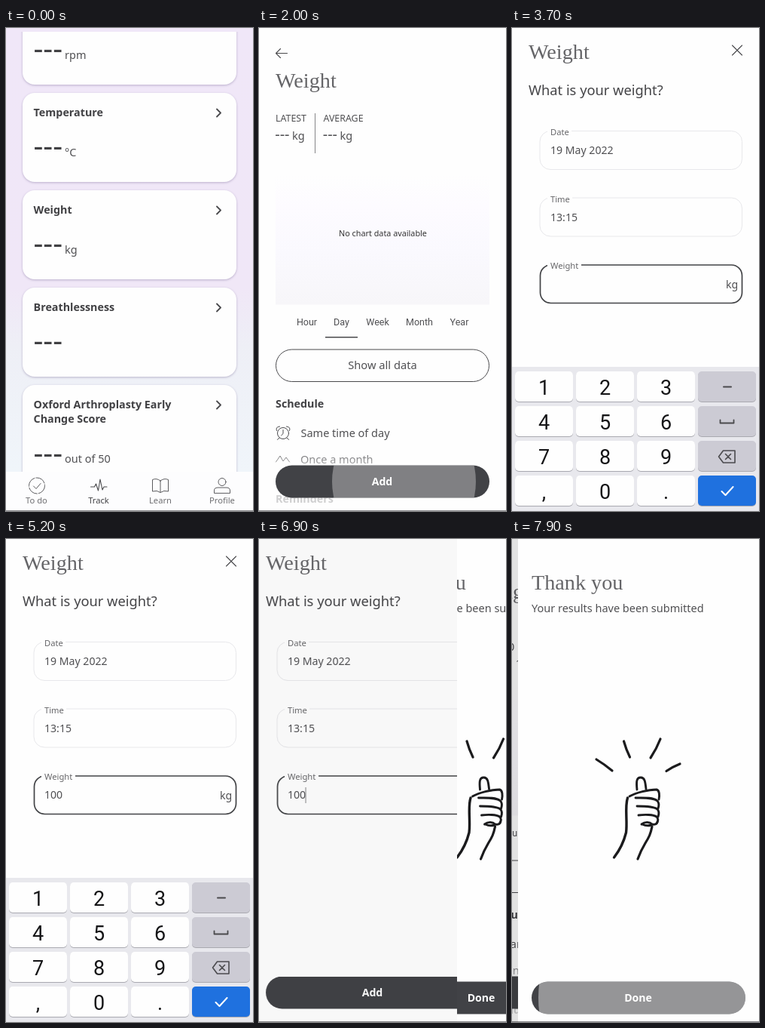
Animation, 328 px wide and 640 px high, one loop 8000 ms. Source, as an HTML page:

```html
<!DOCTYPE html>
<html lang="en">
<head>
<meta charset="utf-8">
<title>Weight tracking</title>
<style>
  html, body { margin: 0; width: 100%; height: 100%; overflow: hidden; background: #fefefe; }
  #stage { position: relative; width: 100%; height: 100%; overflow: hidden; contain: strict; }
  svg.page { position: absolute; left: 0; top: 0; width: 328px; height: 640px; overflow: hidden; }
  text { font: 14.5px "Noto Sans", sans-serif; fill: #505053; white-space: pre; }
  .serif { font: 28.2px "Liberation Serif", serif; fill: #656568; }
  .bold { font-weight: 600; font-size: 14.3px; fill: #414144; }
  .dash { font-size: 40px; fill: #414144; }
  .dash-s { font-size: 20px; }
  .caps { font-size: 12.4px; }
  .mid { text-anchor: middle; }
  .nav text { font-size: 11.2px; text-anchor: middle; fill: #6f6f72; }
  .nav text.on { fill: #414144; }
  .tabs text { font: 12.5px Roboto, sans-serif; text-anchor: middle; }
  .input { font-size: 14.1px; }
  .label { font-size: 11.2px; fill: #666669; }
  .cta { font-size: 14.1px; font-weight: 600; fill: #fff; text-anchor: middle; }
  .dark { fill: #414246; }
  .cards > rect { fill: #fefefe; filter: drop-shadow(0 1px 1.5px #6a5a8a66); }
  .icon { fill: none; stroke: #4a4a4d; stroke-linecap: round; stroke-linejoin: round; }
  .keys text { font: 27px Roboto, sans-serif; fill: #151517; text-anchor: middle; }
  .keys .cap { filter: drop-shadow(0 1px 0 #a9a9b0); }
  .dim { opacity: 0; }
  .edge { fill: #8c8c8e; }
</style>
</head>
<body>
<div id="stage">

<svg class="page" id="list">
  <defs>
    <linearGradient id="sky" x2="0" y2="1">
      <stop offset="0" stop-color="#f0e7f8"/><stop offset=".54" stop-color="#f0e7f7"/>
      <stop offset=".66" stop-color="#eeeff6"/><stop offset=".92" stop-color="#f0f5fa"/>
    </linearGradient>
    <linearGradient id="haze" x2="0" y2="1">
      <stop offset="0" stop-color="#fefefe"/><stop offset=".25" stop-color="#fdfbff"/>
      <stop offset=".6" stop-color="#faf9fe"/><stop offset="1" stop-color="#f7f6f9"/>
    </linearGradient>
    <linearGradient id="fade" x2="0" y2="1">
      <stop offset="0" stop-color="#fefefe" stop-opacity="0"/>
      <stop offset=".4" stop-color="#fefefe" stop-opacity=".75"/>
      <stop offset="1" stop-color="#fefefe" stop-opacity=".75"/>
    </linearGradient>
    <clipPath id="card"><rect x="22" y="215" width="284" height="118" rx="16"/></clipPath>
    <clipPath id="pill"><rect x="22" y="579.5" width="284" height="43" rx="21.5"/></clipPath>
    <clipPath id="pillLow"><rect x="22" y="586.5" width="284" height="43" rx="21.5"/></clipPath>
    <clipPath id="belowTop"><rect y="5" width="328" height="635"/></clipPath>
  </defs>
  <rect width="328" height="640" fill="url(#sky)"/>
  <g class="cards" clip-path="url(#belowTop)">
    <rect x="22" y="-43" width="284" height="118" rx="16"/>
    <rect x="22" y="86" width="284" height="118" rx="16"/>
    <rect x="22" y="215" width="284" height="118" rx="16"/>
    <rect x="22" y="344" width="284" height="118" rx="16"/>
    <rect x="22" y="473" width="284" height="138" rx="16"/>
  </g>
  <g clip-path="url(#card)"><circle id="cardRipple" cx="180" cy="275" r="0" fill="#000" opacity=".12"/></g>
  <text class="dash" x="36.4" y="41">---</text><text x="78" y="40.5">rpm</text>
  <text class="bold" x="36.6" y="116.5">Temperature</text>
  <text class="dash" x="36.4" y="169.5">---</text><text x="78" y="169.5">°C</text>
  <text class="bold" x="36.6" y="245.5">Weight</text>
  <text class="dash" x="36.4" y="298.5">---</text><text x="78" y="298.5">kg</text>
  <text class="bold" x="36.6" y="374.5">Breathlessness</text>
  <text class="dash" x="36.4" y="427.5">---</text>
  <text class="bold" x="36.6" y="503.5">Oxford Arthroplasty Early</text>
  <text class="bold" x="36.6" y="523">Change Score</text>
  <text class="dash" x="36.4" y="576.5">---</text><text x="78" y="576">out of 50</text>
  <path class="icon" stroke-width="1.8" d="M280 107.5l5 5-5 5m0 119l5 5-5 5m0 119l5 5-5 5m0 119l5 5-5 5"/>
  <g class="nav">
    <rect y="588" width="328" height="52" fill="#fdfdfe"/>
    <g class="icon" stroke-width=".9">
      <circle cx="41" cy="606.5" r="10.5" stroke-dasharray="14 2"/>
      <path d="M36.500 607l3.500 3.500 6-7"/>
      <path stroke-width="1.1" d="M112.500 608h5l2-4 3 9 2.500-15 3 14 2-4h4"/>
      <path d="M205 600q-5-4-10.500-1.500v15.500q6-2 10.500 1.500 4.500-3.500 10.500-1.500v-15.500q-5.500-2.500-10.500 1.500zv15"/>
      <circle cx="287" cy="601.5" r="5"/><path d="M276.500 616v-3q0-4 4.500-4h12q4.500 0 4.500 4v3z"/>
    </g>
    <text x="40.5" y="630">To do</text><text class="on" x="123" y="630">Track</text>
    <text x="205" y="630">Learn</text><text x="287" y="630">Profile</text>
  </g>
  <rect class="edge" y="639" width="328" height="1"/>
  <rect class="dim" width="328" height="640"/>
</svg>

<svg class="page" id="detail">
  <rect width="328" height="640" fill="#fefefe"/>
  <path class="icon" stroke-width="1.1" d="M37.500 33.500h-15m6-6l-6 6 6 6"/>
  <text class="serif" x="22" y="79">Weight</text>
  <text class="caps" x="22" y="123.5">LATEST</text>
  <g id="empty">
    <text class="dash-s" x="21.2" y="148">---</text><text x="44" y="147.5">kg</text>
    <rect x="74" y="113" width="1" height="53" fill="#858588"/>
    <text class="caps" x="85.5" y="123.5">AVERAGE</text>
    <text class="dash-s" x="84.7" y="148">---</text><text x="107.5" y="147.5">kg</text>
  </g>
  <g id="filled" opacity="0">
    <text x="22" y="147.5" style="font-size:15px">100.00 kg</text>
    <text x="22" y="170" style="font-size:14.8px">Today, 13:15</text>
    <rect x="116" y="113" width="1" height="53" fill="#858588"/>
    <text class="caps" x="127" y="123.5">AVERAGE</text>
    <text x="127" y="147.5" style="font-size:15px">100.00 kg</text>
  </g>
  <rect x="22" y="195" width="284" height="171.5" fill="url(#haze)"/>
  <text class="mid" x="164.5" y="276" style="font-size:10.8px;fill:#333">No chart data available</text>
  <g class="tabs">
    <text x="63.5" y="394">Hour</text><text x="109.5" y="394">Day</text><text x="157.5" y="394">Week</text>
    <text x="213" y="394">Month</text><text x="266" y="394">Year</text>
  </g>
  <rect x="88" y="409" width="43" height="1.5" fill="#4a4a4d"/>
  <rect x="22.5" y="426" width="283" height="42.5" rx="21.2" fill="none" stroke="#4a4a4d"/>
  <text class="mid" x="164" y="452" style="font-size:14.7px">Show all data</text>
  <text class="bold" x="22" y="503">Schedule</text>
  <g class="icon" stroke-width="1">
    <circle cx="32" cy="537" r="7.5"/>
    <path d="M32 532.500v5l-2.500 2.500M27 543l-2.500 2.500M37 543l2.500 2.500M23.500 533.500q-2-5 4-5.500M40.500 533.500q2-5-4-5.500"/>
    <path d="M22.500 575l5.500-8 4 7 4-5 4.500 6"/>
  </g>
  <text x="55.5" y="541.5">Same time of day</text>
  <text x="55" y="576.5">Once a month</text>
  <text class="bold" x="22" y="629">Reminders</text>
  <rect y="555" width="328" height="85" fill="url(#fade)"/>
  <g clip-path="url(#pill)">
    <rect class="dark" y="570" width="328" height="60"/>
    <circle id="detailRipple" cx="192.5" cy="601" r="0" fill="#fff" opacity=".33"/>
  </g>
  <text class="cta" x="163.5" y="606">Add</text>
  <rect class="edge" y="639" width="328" height="1"/>
  <rect class="dim" width="328" height="640"/>
</svg>

<svg class="page" id="form">
  <rect width="328" height="640" fill="#fefefe"/>
  <text class="serif" x="22" y="41">Weight</text>
  <path class="icon" stroke-width="1.1" d="M292.500 23l13 13m0-13l-13 13"/>
  <text x="22" y="88.5" style="font-size:18.3px;fill:#444447">What is your weight?</text>
  <g fill="none" stroke="#e8e8eb">
    <rect x="37" y="136.5" width="268.5" height="51" rx="14"/>
    <rect x="37" y="225" width="268.5" height="51" rx="14"/>
  </g>
  <path d="M47 132h32v10h-32zM47 220h33v10h-33z" fill="#fefefe"/>
  <text class="label" x="51" y="142">Date</text><text class="input" x="51" y="167">19 May 2022</text>
  <text class="label" x="51" y="230.5">Time</text><text class="input" x="51" y="255.5">13:15</text>
  <g id="idle">
    <rect x="37" y="314" width="268.5" height="50.5" rx="14" fill="none" stroke="#e8e8eb"/>
    <text class="input" x="51" y="344" style="fill:#6a6a6d">Weight</text>
  </g>
  <g id="focus" opacity="0">
    <rect x="37.5" y="314" width="268" height="50.5" rx="14" fill="none" stroke="#434447" stroke-width="1.7"/>
    <path d="M47 309h45v10h-45z" fill="#fefefe"/>
    <text class="label" x="51" y="319">Weight</text>
    <text class="input" x="284" y="345">kg</text>
    <text class="input value" opacity="0" x="51" y="344">1</text>
    <text class="input value" opacity="0" x="51" y="344">10</text>
    <text class="input value" opacity="0" x="51" y="344">100</text>
    <rect id="caret" x="51" y="329" width="1" height="21" fill="#838386"/>
  </g>
  <g clip-path="url(#pill)">
    <rect class="dark" y="570" width="328" height="60"/>
    <circle id="formRipple" cx="192.5" cy="601" r="0" fill="#fff" opacity=".33"/>
  </g>
  <text class="cta" x="163.5" y="606">Add</text>
  <rect class="edge" y="639" width="328" height="1"/>
  <g id="keyboard" class="keys"><rect y="449" width="328" height="191" fill="#e8e8ed"/></g>
  <rect class="dim" width="328" height="640"/>
</svg>

<svg class="page" id="thanks">
  <rect width="328" height="640" fill="#fefefe"/>
  <text class="serif" x="22" y="67">Thank you</text>
  <text x="22" y="96.5">Your results have been submitted</text>
  <g class="icon" transform="translate(-4)" style="stroke:#1b1b1d" stroke-width="2.9">
    <path d="M112 292q10 6 21 15M148.500 268q3 11 8 21M197 265q-5 13-13 25M223 298q-10 4-18 9.500" stroke-width="3.2"/>
    <path d="M166 332c-1-10-1-16 5-16s6 8 7 15"/>
    <path d="M153.500 343c-4 12 0 31-2 46-3 12-9 24-16 33" stroke-width="3.4"/>
    <path d="M156 341c9-5 25-9 36-9 4 1 4 8 3 13"/>
    <path d="M164 343c9 0 23-1 29 4 3 3 2 7 1 10M166 354c8 0 22 0 27 4 3 3 2 7 1 10M168 366c8-1 20-1 24 2 3 3 2 6 0 9"/>
    <path d="M172 378c5-4 11-3 14 0 4 1 7-1 7-3M173 378q6 3 12 1"/>
    <path d="M186 381c-2 10-4 14-9 22q-6 10-10 21" stroke-width="3.2"/>
  </g>
  <g clip-path="url(#pillLow)">
    <rect class="dark" y="580" width="328" height="60"/>
    <circle id="doneRipple" cx="188" cy="608" r="0" fill="#fff" opacity=".44"/>
  </g>
  <text class="cta" x="163.5" y="613">Done</text>
  <rect class="edge" y="639" width="328" height="1"/>
</svg>

</div>
<script>
const LOOP = 8000;
const $ = sel => document.querySelector(sel);

// Keypad
const rowTop = [455, 501, 547, 593];
const special = [
  '<path class="icon" stroke-width="2" d="M281 475.500h10"/>',
  '<path class="icon" stroke-width="1.8" d="M276.500 519.500v4h18v-4"/>',
  '<path class="icon" stroke-width="1.6" d="M274.500 568l6-8h15.500v16h-15.500zM283.500 564.500l7 7m0-7l-7 7"/>',
  '<path class="icon" style="stroke:#fff" stroke-width="2" d="M278.500 614l5 5 10-11"/>'
];
const cap = (x, y, fill, extra = '') =>
  `<rect class="cap" x="${x}" y="${y}" width="77" height="40" rx="5" fill="${fill}" ${extra}/>`;
let keys = '';
['123', '456', '789', ',0.'].forEach((row, r) => {
  const y = rowTop[r];
  [...row].forEach((char, c) => {
    const x = 4 + 81 * c;
    keys += cap(x, y, '#fefefe');
    if (char === '0') keys += cap(x, y, '#d4d4da', 'id="zeroDown" opacity="0"');
    keys += `<text x="${x + 38.5}" y="${y + 31}">${char}</text>`;
  });
  keys += cap(247, y, r < 3 ? '#cccbd4' : '#1f71df');
  if (r === 3) keys += cap(247, y, '#1959b3', 'id="okDown" opacity="0"');
  keys += special[r];
});
$('#keyboard').insertAdjacentHTML('beforeend', keys);

// Keyframes are [ms, properties]; time advances at ten pictures per second.
const timing = { duration: LOOP, iterations: Infinity, delay: -5, easing: `steps(${LOOP / 100}, end)` };
function play(target, frames, easing = 'linear') {
  const el = typeof target === 'string' ? $(target) : target;
  const padded = [[0, frames[0][1]], ...frames, [LOOP, frames.at(-1)[1]]];
  el.animate(padded.map(([ms, props]) => ({ offset: ms / LOOP, easing, ...props })), timing);
}
const toggle = (target, on, ...flips) => play(target,
  [[0, { opacity: +on }], ...flips.map((ms, i) => [ms, { opacity: +(on !== (i % 2 === 0)) }])], 'step-end');
const ripple = (target, ...sizes) => play(target, sizes.map(([ms, r]) => [ms, { r: r + 'px' }]));

// Page changes: the new page is uncovered from the right, the old one drifts left and darkens.
const glide = [0, .198, .543, .82, .95, 1];
const during = (start, pose) => glide.map((p, i) => [start + i * 100, pose(p)]);
const shift = (x, clip) => ({ transform: `translateX(${x}px)`, clipPath: `inset(0px 0px 0px ${clip}px)` });
const enter = p => shift(164 * (1 - p), 164 * (1 - p));
const leave = p => shift(-65.6 * p, 0);
const darken = p => ({ opacity: .11 * p });

play('#list', during(500, leave));
play('#detail', [...during(500, enter), ...during(2000, leave)]);
play('#form', [...during(2000, enter), ...during(6800, leave)]);
play('#thanks', [...during(6800, enter), [7800, enter(1)], [7900, enter(.9756)]]);
play('#list .dim', during(500, darken));
play('#detail .dim', during(2000, darken));
play('#form .dim', during(6800, darken));
toggle('#form', true, 7400);
toggle('#empty', true, 7400);
toggle('#filled', false, 7400);

// Touches
ripple('#cardRipple', [400, 0], [500, 60], [600, 130], [700, 200]);
ripple('#detailRipple', [1900, 0], [2000, 95.5], [2100, 160], [2500, 160], [2600, 0]);
ripple('#formRipple', [6000, 0], [6100, 40], [6200, 95], [6300, 160], [6800, 160]);
play('#formRipple', [[6400, { opacity: .33 }], [6800, { opacity: 0 }]]);
ripple('#doneRipple', [7700, 0], [7800, 80], [7900, 157]);
toggle('#zeroDown', false, 4400, 4500, 4600, 4700);
toggle('#okDown', false, 5400, 5500);

// Typing
toggle('#idle', true, 3200);
toggle('#focus', false, 3200);
const [one, ten, hundred] = document.querySelectorAll('.value');
toggle(one, false, 4100, 4500);
toggle(ten, false, 4500, 4700);
toggle(hundred, false, 4700);
toggle('#caret', true, 3700, 4100, 5200, 5700, 6200, 6700, 7200);
play('#caret', [[0, 0], [4100, 8], [4500, 16], [4700, 23.5]]
  .map(([ms, x]) => [ms, { transform: `translateX(${x}px)` }]), 'step-end');
play('#keyboard', [[3200, 191], [3300, 150], [3400, 80], [3500, 30], [3600, 8], [3700, 0],
  [5400, 0], [5500, 60], [5600, 150], [5700, 191]]
  .map(([ms, y]) => [ms, { transform: `translateY(${y}px)` }]));
</script>
</body>
</html>
```
